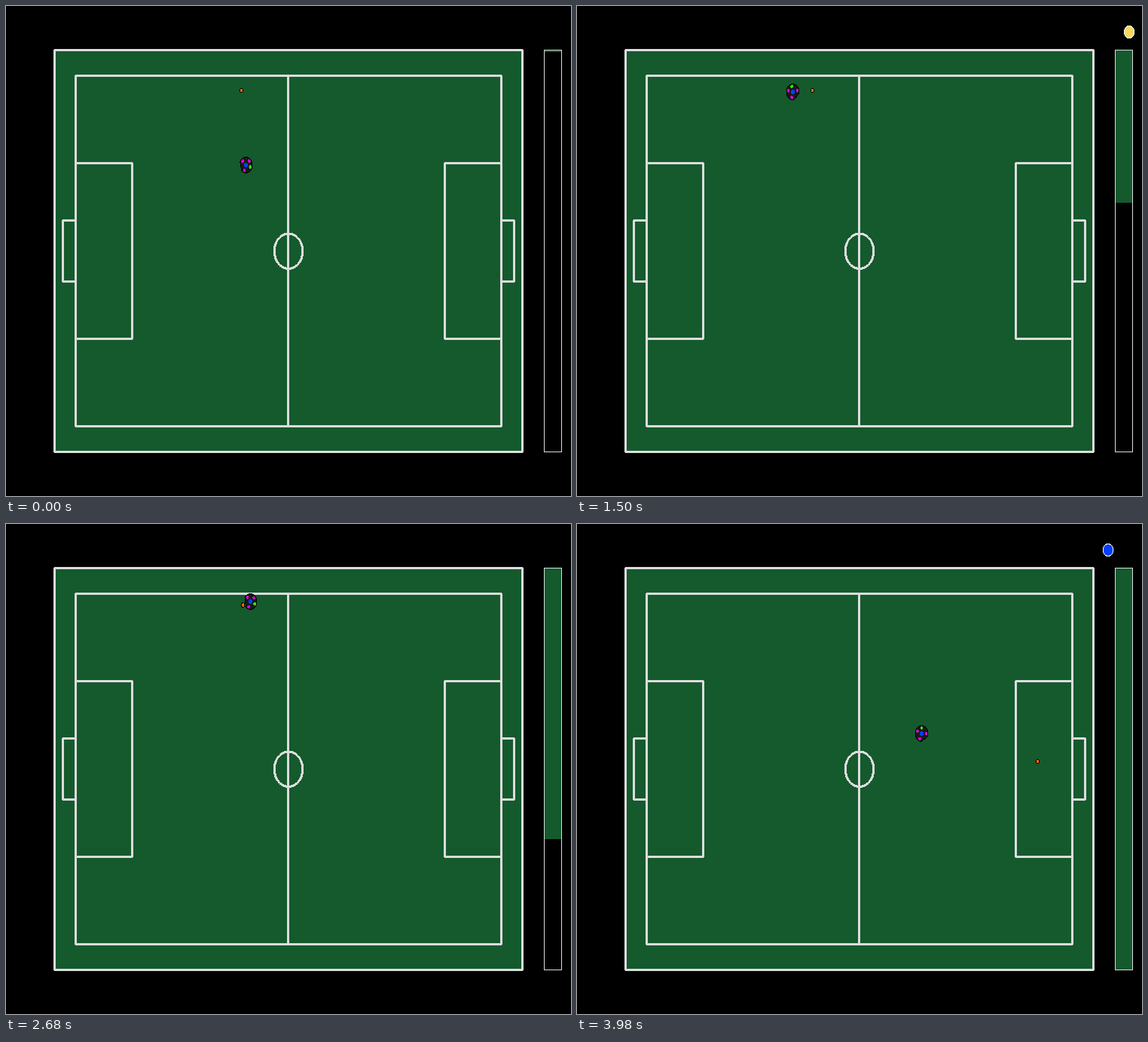
Recreate the animation shown at these times as an HTML page with a canvas. Size 750 by 650 pixels, loop 4.03 s.

```html
<!DOCTYPE html>
<html>
<head>
<meta charset="utf-8">
<style>
html, body { margin: 0; width: 100%; height: 100%; overflow: hidden; background: #000; }
canvas { display: block; }
</style>
</head>
<body>
<canvas id="stage" width="750" height="650"></canvas>
<script>
const ctx = document.getElementById('stage').getContext('2d');
const LOOP = 4030, STEP = 20, STEPS = 200;
const GREEN = 'rgb(20,90,45)', LINE = 'rgb(220,220,220)', BLUE = 'rgb(0,64,255)';
const PINK = 'rgb(220,0,220)', LIME = 'rgb(57,220,20)', YELLOW = 'rgb(250,218,94)';
const ORANGE = 'rgb(253,106,2)', BODY = 'rgb(25,25,25)';
const ASPECT = 0.81, RAD = Math.PI / 180;

// time, x, y, heading in degrees
const path = [
  [0, 318.5, 211, 167], [240, 301, 215.5, 211], [700, 257, 188, 296],
  [1100, 255, 140, 355], [1500, 286.5, 114, 405], [1920, 332.5, 121, 268],
  [2680, 324.5, 103, 171], [3220, 347.5, 153.5, 339], [3980, 457.5, 278, 417]
];
const BUMP = 1640, FREE = 1920, CATCH = 2640, KICK = 3660, END = 3980;

const ramp = (t, a, b) => Math.min(1, Math.max(0, (t - a) / (b - a)));
const mix = (p, q, u) => p.map((v, i) => v + (q[i] - v) * u);

// Point at a distance and angle from a centre, in the squeezed view
function polar(x, y, r, degrees) {
  const a = degrees * RAD;
  return [x + r * ASPECT * Math.cos(a), y + r * Math.sin(a)];
}

// Cubic Hermite curve through unevenly spaced keys
function robotAt(t) {
  let i = 0;
  while (i < path.length - 2 && t >= path[i + 1][0]) i++;
  const a = path[i], b = path[i + 1];
  const before = path[i - 1] || a, after = path[i + 2] || b;
  const d = b[0] - a[0], u = (t - a[0]) / d, v = 1 - u;
  return [1, 2, 3].map(k => {
    const ma = (b[k] - before[k]) / (b[0] - before[0]) * d;
    const mb = (after[k] - a[k]) / (after[0] - a[0]) * d;
    return a[k] * (1 + 2 * u) * v * v + ma * u * v * v
      + b[k] * u * u * (3 - 2 * u) - mb * u * u * v;
  });
}

function carried(t) {
  const [x, y, heading] = robotAt(t);
  return polar(x, y, 13, heading - 11);
}

// The ball rests, is bumped, then carried and finally kicked
function ballAt(t) {
  if (t > KICK) return mix(carried(KICK), [611.5, 315], ramp(t, KICK, END));
  const loose = mix([312.5, 112], [321, 106], ramp(t, BUMP, FREE));
  return mix(loose, carried(t), ramp(t, CATCH - 300, CATCH));
}

// Hard-edged ellipse, optionally cut by a test on the offset
function oval(x, y, rx, ry, color, keep = () => true) {
  ctx.fillStyle = color;
  for (let py = Math.floor(y - ry); py <= y + ry; py++) {
    for (let px = Math.floor(x - rx); px <= x + rx; px++) {
      const dx = px + 0.5 - x, dy = py + 0.5 - y;
      if ((dx / rx) ** 2 + (dy / ry) ** 2 <= 1 && keep(dx, dy)) ctx.fillRect(px, py, 1, 1);
    }
  }
}

function outlined(x, y, rx, ry, fill, edge) {
  oval(x, y, rx, ry, edge);
  oval(x, y, rx - 1, ry - 1, fill);
}

// Four butt-ended lines, which leave the outer corner pixels empty
function box(x1, y1, x2, y2, width = 3) {
  const half = (width - 1) / 2;
  ctx.fillStyle = LINE;
  for (const y of [y1, y2]) ctx.fillRect(x1, y - half, x2 - x1 + 1, width);
  for (const x of [x1, x2]) ctx.fillRect(x - half, y1, width, y2 - y1 + 1);
}

function ring(x, y, rx, ry) {
  for (let a = 0; a < 360; a++) {
    const c = Math.cos(a * RAD), s = Math.sin(a * RAD);
    const px = Math.floor(x + rx * c), py = Math.floor(y + ry * s);
    if (Math.abs(rx * s) > Math.abs(ry * c)) ctx.fillRect(px, py - 1, 1, 3);
    else ctx.fillRect(px - 1, py, 3, 1);
  }
}

function drawField() {
  ctx.fillStyle = GREEN;
  ctx.fillRect(64, 58, 622, 534);
  box(64, 58, 685, 591);
  box(92, 92, 657, 557);
  box(92, 208, 167, 441);
  box(582, 208, 657, 441);
  box(75, 284, 92, 365);
  box(657, 284, 674, 365);
  ctx.fillRect(373, 92, 3, 466);
  ring(375, 325.2, 18.8, 23.25);
}

function drawRobot([x, y, heading]) {
  const [fx, fy] = polar(0, 0, 1, heading);
  const behind = reach => (dx, dy) => dx * fx / ASPECT ** 2 + dy * fy < reach;
  oval(x, y, 9, 11, '#000', behind(9));
  oval(x, y, 8, 10, BODY, behind(8));
  oval(x, y, 2.4, 2.9, BLUE);
  for (const angle of [57.4, -57.4, 147.4, -147.4]) {
    oval(...polar(x, y, 7.5, heading + angle), 1.9, 2.3, angle < -90 ? LIME : PINK);
  }
}

function drawBar(step) {
  ctx.fillStyle = GREEN;
  ctx.fillRect(715, 58, 22, Math.round(533 * (step + 1) / STEPS));
  box(714, 58, 737, 591, 1);
}

function draw(now) {
  const step = Math.min(STEPS - 1, Math.floor(now % LOOP / STEP)), t = step * STEP;
  const during = (on, off) => t >= on && t < off;
  ctx.fillStyle = '#000';
  ctx.fillRect(0, 0, 750, 650);
  drawField();
  drawBar(step);
  drawRobot(robotAt(t));
  outlined(...ballAt(t), 2.8, 3.4, ORANGE, '#000');
  if (during(1000, 1240) || during(1300, 1700) || during(2200, 2300)) {
    outlined(733, 34.5, 7, 8.7, YELLOW, '#fff');
  }
  if (t >= KICK) outlined(705, 34.5, 7, 8.7, BLUE, '#fff');
}

const start = performance.now();
function tick() {
  draw(performance.now() - start);
  requestAnimationFrame(tick);
}
tick();
</script>
</body>
</html>
```
